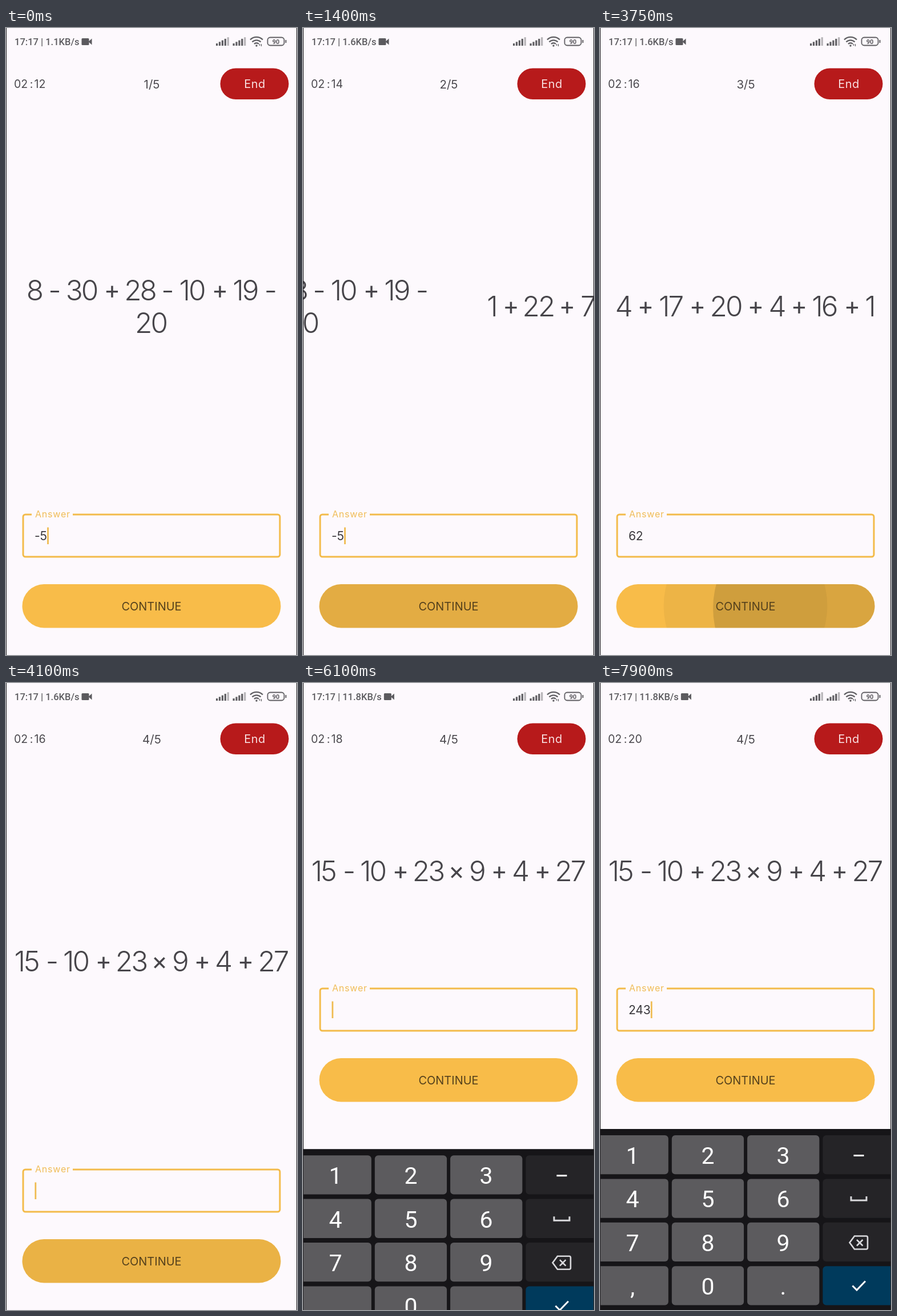
An HTML page that plays this animation: 510 by 1098 pixels, repeating every 8000 ms.

```html
<!DOCTYPE html>
<html lang="en">
<head>
<meta charset="utf-8">
<title>Mental arithmetic</title>
<style>
  html, body { margin: 0; width: 100%; height: 100%; overflow: hidden; background: #fdf9fd; }
  svg { display: block; width: 510px; height: 1098px; font-family: Inter, "Open Sans", sans-serif; font-weight: 380; }
  .mid { text-anchor: middle; }
  .status { font: 500 16.5px Roboto, sans-serif; fill: #5b5a5e; }
  .icon { fill: none; stroke: #605f63; stroke-width: 2.4; }
  .clock { font-size: 19.5px; fill: #4b494e; }
  .sum { font-size: 49.5px; font-weight: 340; letter-spacing: -3px; fill: #47454a; }
  .operator { font-size: 43px; font-weight: 370; }
  .key { font: 400 41px Roboto, sans-serif; fill: #fff; }
  .glyph { fill: none; stroke: #d9d9dc; stroke-width: 3; }
</style>
</head>
<body>
<svg viewBox="0 0 510 1098">
  <defs>
    <clipPath id="pill"><rect x="28.5" y="974" width="453" height="76.5" rx="38.2"/></clipPath>
  </defs>
  <rect width="510" height="1098" fill="#fdf9fd"/>

  <g>
    <text id="net" class="status" x="15" y="30"></text>
    <g id="camera" fill="#5b5a5e">
      <rect y="18" width="13" height="12" rx="1.5"/>
      <path d="M12 24l6-5.5v11z"/>
    </g>
    <g id="signal" fill="#605f63"></g>
    <g class="icon">
      <path d="M428 20.5a15.5 15.5 0 0 1 22 0M431.5 24.5a10.5 10.5 0 0 1 15 0M435 28a5.6 5.6 0 0 1 8 0"/>
      <rect x="458.5" y="16.5" width="29" height="14" rx="4.5" stroke-width="1.8"/>
    </g>
    <circle cx="439" cy="31" r="1.7" fill="#605f63"/>
    <path d="M444.5 31v-3M447.5 28v4" stroke="#605f63" stroke-width="1.3"/>
    <rect x="489.5" y="21" width="2" height="5" fill="#605f63"/>
    <text class="status mid" x="473" y="27.5" style="font-size:11px;font-weight:700">90</text>
  </g>

  <g class="clock">
    <text x="14" y="105">02</text>
    <text class="mid" x="44.5" y="105">:</text>
    <text id="sec" x="49.5" y="105"></text>
    <text id="count" class="mid" x="255.5" y="106" font-size="20.5"></text>
  </g>
  <rect x="375.5" y="70.5" width="120" height="54.5" rx="27.2" fill="#b71a1b"/>
  <text class="mid" x="436" y="105" font-size="20" letter-spacing=".5" fill="#f8dfe0">End</text>

  <g id="sums" class="sum mid"></g>

  <g id="form">
    <path d="M45 852H34a4 4 0 0 0-4 4v66a4 4 0 0 0 4 4h442a4 4 0 0 0 4-4v-66a4 4 0 0 0-4-4H117"
          fill="none" stroke="#f3bb4a" stroke-width="3"/>
    <text x="51" y="857" font-size="16" letter-spacing=".8" fill="#f0bd58">Answer</text>
    <text id="answer" x="50" y="897" font-size="21" letter-spacing="-.2" fill="#39373b"></text>
    <rect id="caret" y="874.5" width="2.8" height="29.5" fill="#f0bc52"/>
    <g clip-path="url(#pill)">
      <rect x="28" y="973" width="454" height="78" fill="#f8bc49"/>
      <circle id="glow" cx="255" cy="1012"/>
      <circle id="ripple" cx="355" cy="1016"/>
    </g>
    <text class="mid" x="255" y="1019.5" font-size="20" fill="#54401c">CONTINUE</text>
  </g>

  <g id="keyboard">
    <rect y="781" width="510" height="320" fill="#161518"/>
    <g id="keys" class="key mid"></g>
    <g class="glyph">
      <path d="M444.5 827.5h18" stroke="#fff"/>
      <path d="M440 899v7h27v-7"/>
      <path d="M446 968.5h20.5a2.5 2.5 0 0 1 2.5 2.5v18a2.5 2.5 0 0 1-2.5 2.5H446l-8.5-11.5zM450 975l10.5 10.5M460.5 975L450 985.5" stroke-width="2.6"/>
      <path d="M442.5 1055.5l7.5 7.5 15-15.5" stroke="#fff"/>
    </g>
  </g>

  <path d="M.5 0V1098M509.5 0V1098" stroke="#262428"/>
</svg>

<script>
const LOOP = 8000;
const $ = id => document.getElementById(id);
const clamp = v => Math.min(1, Math.max(0, v));
const ramp = (t, from, to) => clamp((t - from) / (to - from));
const smooth = p => p * p * (3 - 2 * p);

function add(parent, tag, attrs, text = '') {
  const node = document.createElementNS('http://www.w3.org/2000/svg', tag);
  for (const name in attrs) node.setAttribute(name, attrs[name]);
  node.textContent = text;
  return parent.appendChild(node);
}

// Each line: expression, baseline, centre of every term
const sums = [
  [['8 - 30 + 28 - 10 + 19 -', 477, [51, 85.5, 133.5, 186, 236, 283.5, 327, 375, 420.5, 464]],
   ['20', 534, [255]]],
  [['1 + 22 + 7 + 29 - 3', 505, [77, 109.5, 158.5, 208, 245, 289, 346, 394, 428.5]]],
  [['4 + 17 + 20 + 4 + 16 + 1', 505, [42, 80, 125, 171, 221.5, 273, 311, 349, 394.5, 442, 474]]],
  [['15 - 10 + 23 × 9 + 4 + 27', 505, [37, 81, 123.5, 171, 220.5, 269, 306, 344, 381.5, 420, 469]]],
];

function addTerm(page, term, centre, baseline) {
  const small = '+×'.includes(term);
  add(page, 'text', {
    x: centre - 1.5, // half of the trailing letter-spacing
    y: baseline - (small ? 3.5 : 0),
    class: small ? 'operator' : 'number',
  }, term);
}

const pages = sums.map(lines => {
  const page = add($('sums'), 'g', {});
  for (const [terms, baseline, centres] of lines)
    terms.split(' ').forEach((term, i) => addTerm(page, term, centres[i], baseline));
  return page;
});

for (const x0 of [368, 397.5])
  for (let i = 0; i < 5; i++) {
    const height = 4 + i * 2.7;
    add($('signal'), 'rect', { x: x0 + i * 4.9, y: 31 - height, width: 3.2, height, opacity: i < 4 ? 1 : 0.45 });
  }

const keys = {};
['123 ', '456 ', '789 ', ',0. '].forEach((row, r) => [...row].forEach((label, c) => {
  const y = 792 + r * 76.4;
  const fill = c < 3 ? '#5c5b5e' : r < 3 ? '#252427' : '#003a5c';
  keys[label] = add($('keys'), 'rect', { x: -6.5 + c * 132.3, y, width: 126.3, height: 68.3, rx: 6, fill });
  add($('keys'), 'text', { x: 57 + c * 132, y: y + 50 }, label);
}));

const slides = [1251, 2465, 3755];
const SLIDE = 300;
const taps = [[800, 1330, 1560], [2450, 2700, 3000], [3650, 3900, 4250]]; // press, fade start, fade end
const typing = [
  [-50, '-5'], [1550, ''], [2050, '5'], [2200, '55'], [2760, ''], [2960, '6'], [3210, '62'],
  [4010, ''], [6450, '2'], [7050, '24'], [7660, '243'],
];
const presses = [[6400, '2'], [7000, '4'], [7620, '3']];

function drawRipple(t) {
  const tap = taps.filter(([start]) => t >= start).pop();
  const age = tap ? t - tap[0] : 0;
  $('ripple').setAttribute('r', 1.2 * age + 0.0035 * age * age);
  $('ripple').setAttribute('opacity', tap ? 0.125 * (1 - ramp(t, tap[1], tap[2])) : 0);
  $('glow').setAttribute('r', 1.42 * age);
  $('glow').setAttribute('opacity', 0.045 * (1 - ramp(age, 100, 200)));
}

function drawAnswer(t) {
  const [since, value] = typing.filter(([start]) => t >= start).pop();
  $('answer').textContent = value;
  $('caret').setAttribute('x', 50.4 + (value ? $('answer').getComputedTextLength() : 0));
  $('caret').setAttribute('opacity', (t - since) % 1000 < 500 ? 1 : 0);
}

function drawKeyboard(t) {
  const rise = 1 - (1 - ramp(t, 5940, 6250)) ** 3;
  $('keyboard').setAttribute('transform', `translate(0 ${317 * (1 - rise)})`);
  for (const [start, label] of presses) {
    const lit = t < start ? 0 : 1 - ramp(t, start + 80, start + 240);
    keys[label].setAttribute('fill', `rgb(${92 + 28 * lit} ${91 + 28 * lit} ${94 + 28 * lit})`);
  }
}

function draw(t) {
  const rate = t < 400 ? '1.1' : t < 4400 ? '1.6' : '11.8';
  $('net').textContent = `17:17 | ${rate}KB/s`;
  $('camera').setAttribute('transform', `translate(${19 + $('net').getComputedTextLength()} 0)`);
  $('sec').textContent = 12 + Math.floor((t + 800) / 1000);
  $('count').textContent = `${1 + slides.filter(start => t >= start).length}/5`;

  const compact = t >= 6000;
  const page = slides.reduce((sum, start) => sum + smooth(ramp(t, start, start + SLIDE)), 0);
  pages.forEach((node, i) =>
    node.setAttribute('transform', `translate(${(i - page) * 510} ${compact ? -158 : 0})`));
  $('form').setAttribute('transform', `translate(0 ${compact ? -317 : 0})`);

  drawRipple(t);
  drawAnswer(t);
  drawKeyboard(t);
}

const begin = performance.now();
function tick() {
  draw((performance.now() - begin) % LOOP);
  requestAnimationFrame(tick);
}
tick();
</script>
</body>
</html>
```
